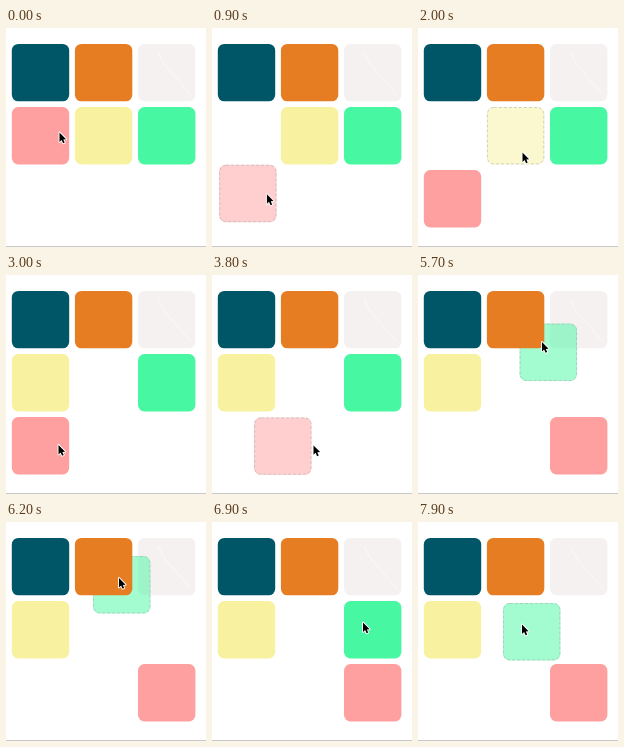
These frames come from a looping animation (200x219 px, 8 s). An HTML page with a canvas:

```html
<!DOCTYPE html>
<html lang="en">
<head>
<meta charset="utf-8">
<title>Draggable tiles</title>
<style>
  html, body { margin: 0; width: 100%; height: 100%; overflow: hidden; background: #fff; }
  canvas { display: block; width: 200px; height: 219px; }
</style>
</head>
<body>
<canvas id="stage"></canvas>
<script>
const W = 200, H = 219, LOOP = 8000, STEP = 100, LAG = 50;
const SIZE = 57.4, PITCH = 63.1, LEFT = 5.8, TOP = 15.9, RADIUS = 6.5;
const canvas = document.getElementById('stage');
const ctx = canvas.getContext('2d');
const dpr = window.devicePixelRatio || 1;
canvas.width = W * dpr;
canvas.height = H * dpr;

const easeOut = p => 1 - (1 - p) ** 3;
const smooth = p => p * p * (3 - 2 * p);
const overshoot = p => 1 + 2.9 * (p - 1) ** 3 + 1.9 * (p - 1) ** 2;

const cell = (col, row) => ({ x: LEFT + col * PITCH, y: TOP + row * PITCH });

// The pointer rests between moves; sag bows a move downwards
const rest = { x: 53.5, y: 104.5 };
const moves = [
  { from: 300, to: 1000, x: 55, y: 170, ease: smooth },
  { from: 1000, to: 1500, x: 104.5, y: 124.5, ease: easeOut },
  { from: 2000, to: 2800, x: 53, y: 122, ease: overshoot, sag: 13 },
  { from: 2800, to: 3000, x: 52.5, y: 170, ease: smooth },
  { from: 3500, to: 4200, x: 177, y: 171, ease: smooth },
  { from: 4200, to: 5000, x: 158, y: 101, ease: smooth },
  { from: 5400, to: 6200, x: 113, y: 56, ease: easeOut },
  { from: 6300, to: 6900, x: 151, y: 100.5, ease: smooth },
  { from: 7200, to: 7800, x: 104, y: 102.5, ease: smooth }
];

// Painted in this order
const tiles = [
  { color: '#005566', home: cell(0, 0) },
  { color: '#f6f1f1', home: cell(2, 0), scratch: true },
  { color: '#ffa0a0', home: cell(0, 1), drags: [
    { from: 400, to: 1000, drop: cell(0, 2) },
    { from: 3600, to: 4300, drop: cell(2, 2) }] },
  { color: '#f7f1a0', home: cell(1, 1), drags: [
    { from: 2000, to: 2900, drop: cell(0, 1) }] },
  { color: '#48f7a2', home: cell(2, 1), drags: [
    { from: 5500, to: 6300, drop: cell(2, 1) },
    { from: 7300, to: LOOP, drop: cell(2, 1) }] },
  { color: '#e67d22', home: cell(1, 0) }
];

function pointer(t) {
  let at = rest;
  for (const m of moves) {
    if (t <= m.from) break;
    const p = Math.min(1, (t - m.from) / (m.to - m.from)), k = m.ease(p);
    at = {
      x: at.x + (m.x - at.x) * k,
      y: at.y + (m.y - at.y) * k + (m.sag || 0) * Math.sin(Math.PI * p)
    };
  }
  return at;
}

function pose({ home, drags = [] }, t) {
  let at = home;
  for (const d of drags) {
    if (t >= d.to) {
      at = d.drop;
    } else if (t >= d.from) {
      const grab = pointer(d.from - STEP), now = pointer(t - LAG);
      return { x: at.x + now.x - grab.x, y: at.y + now.y - grab.y, held: true };
    }
  }
  return { ...at, held: false };
}

function drawTile(tile, t) {
  const { x, y, held } = pose(tile, t);
  ctx.save();
  ctx.globalAlpha = held ? 0.5 : 1;
  ctx.fillStyle = tile.color;
  ctx.beginPath();
  ctx.roundRect(x, y, SIZE, SIZE, RADIUS);
  ctx.fill();
  if (held) {
    ctx.strokeStyle = '#aaa';
    ctx.setLineDash([3, 2]);
    ctx.beginPath();
    ctx.roundRect(x + 0.5, y + 0.5, SIZE - 1, SIZE - 1, RADIUS);
    ctx.stroke();
  }
  if (tile.scratch) {
    ctx.strokeStyle = 'rgba(255,255,255,0.5)';
    ctx.beginPath();
    ctx.moveTo(x + 20, y + 8);
    ctx.lineTo(x + 26, y + 20);
    ctx.lineTo(x + 53, y + 51);
    ctx.stroke();
  }
  ctx.restore();
}

function drawPointer({ x, y }) {
  const shape = [[0, 0], [0, 9.4], [2.1, 7.4], [3.6, 10.8], [5.2, 10.1], [3.8, 6.9], [6.6, 6.7]];
  ctx.save();
  ctx.beginPath();
  shape.forEach(([dx, dy]) => ctx.lineTo(x + dx, y + dy));
  ctx.closePath();
  ctx.lineWidth = 1.8;
  ctx.lineJoin = 'round';
  ctx.strokeStyle = '#fff';
  ctx.stroke();
  ctx.fillStyle = '#000';
  ctx.fill();
  ctx.restore();
}

function draw(t) {
  ctx.setTransform(dpr, 0, 0, dpr, 0, 0);
  ctx.fillStyle = '#fff';
  ctx.fillRect(0, 0, W, H);
  ctx.fillStyle = '#c8c8c8';
  ctx.fillRect(0, H - 1, W, 1);
  tiles.forEach(tile => drawTile(tile, t));
  drawPointer(pointer(t));
}

const start = performance.now();
function frame() {
  const t = (performance.now() - start) % LOOP;
  draw(Math.floor(t / STEP) * STEP);
  requestAnimationFrame(frame);
}
frame();
</script>
</body>
</html>
```
